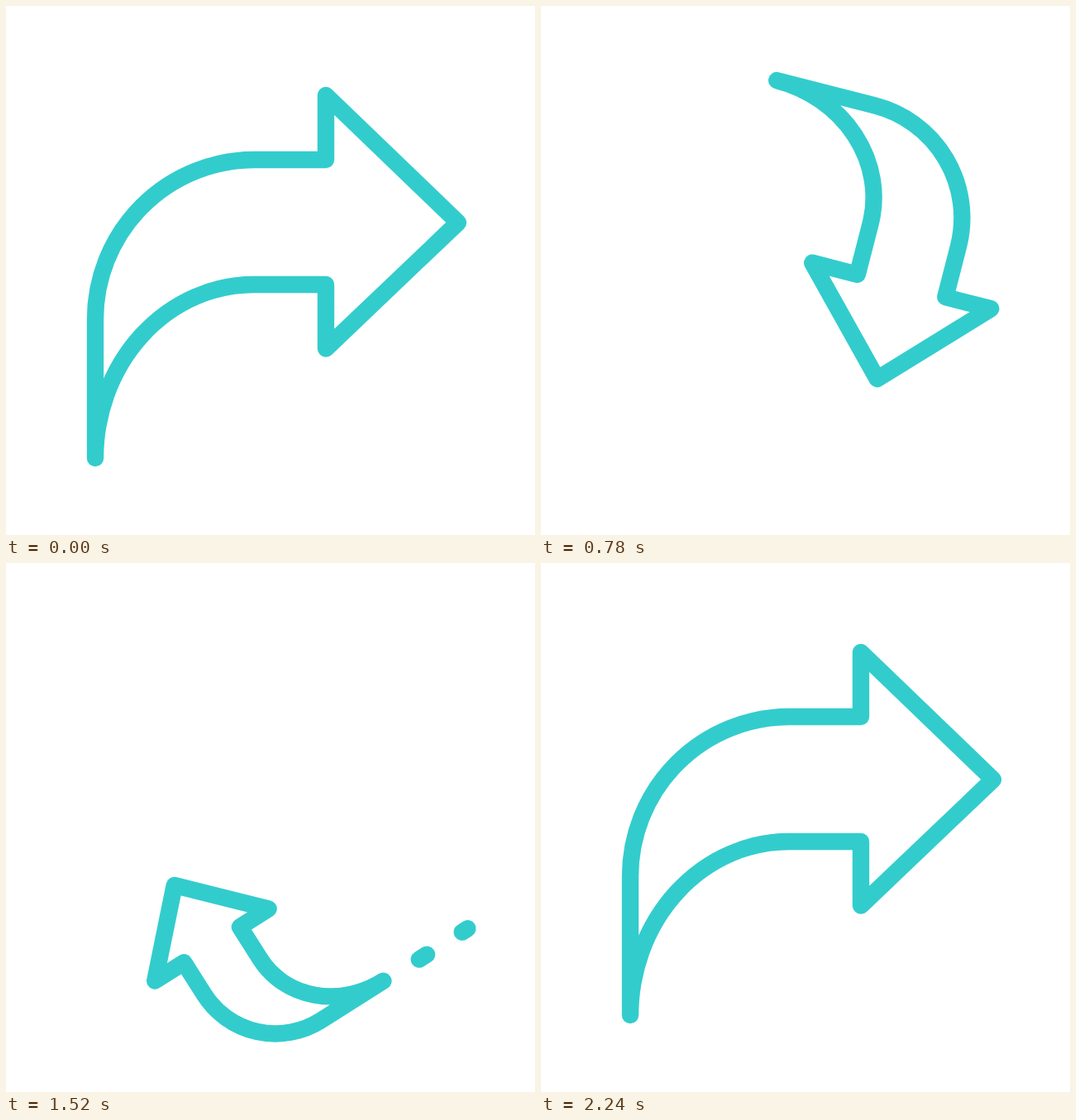
Write an HTML page that moves like this. It is 640 px wide and 640 px high and loops after 2400 ms.

```html
<!DOCTYPE html>
<html lang="en">
<head>
<meta charset="utf-8">
<title>Turning arrow</title>
<style>
  html, body { margin: 0; width: 100%; height: 100%; overflow: hidden; background: #fff; }
  svg { display: block; width: 100%; height: 100%; }
  path { fill: none; stroke: #33cccd; stroke-width: 20.4; stroke-linecap: round; stroke-linejoin: round; }
</style>
</head>
<body>
<svg viewBox="0 0 640 640">
  <g id="spin">
    <path id="dashA"/>
    <path id="dashB"/>
    <path id="arrow" d="M108 547V379A192.5 193 0 0 1 300 186H387V108L547 262L387 414.5V337H300A192 210 0 0 0 108 547Z"/>
  </g>
</svg>
<script>
const LOOP = 2400, STEP = 20, STROKE = 20.4;
const CENTER = 327.5;              // pivot of the turn
const ANCHOR = { x: 108, y: 107.5 }; // fixed corner while shrinking
const TAIL_Y = 547, DASH_X = 106.8;

// [time, value] tables, linear between entries
const angle = [[200, 0], [2200, 360]];
const size = [[200, 1], [1200, 0.531], [1700, 0.531], [2200, 1]];
const dashes = [
  { id: 'dashA', on: 1100, off: 1840,
    from: [[1220, 399.5], [1520, 391.5], [1840, 388]],
    to: [[1100, 399.5], [1220, 410], [1280, 412], [1520, 402.5], [1840, 397]] },
  { id: 'dashB', on: 1420, off: 2040,
    from: [[1520, 453], [1820, 461], [1880, 464]],
    to: [[1420, 453], [1520, 461], [1820, 471], [1880, 474]] }
];

const el = id => document.getElementById(id);

function at(table, t) {
  if (t <= table[0][0]) return table[0][1];
  for (let i = 1; i < table.length; i++) {
    const [t0, v0] = table[i - 1], [t1, v1] = table[i];
    if (t <= t1) return v0 + (v1 - v0) * (t - t0) / (t1 - t0);
  }
  return table[table.length - 1][1];
}

function draw(t) {
  const s = at(size, t);
  const tail = ANCHOR.y + s * (TAIL_Y - ANCHOR.y);
  el('spin').setAttribute('transform', `rotate(${at(angle, t)} ${CENTER} ${CENTER})`);

  const arrow = el('arrow');
  arrow.setAttribute('transform',
    `translate(${ANCHOR.x} ${ANCHOR.y}) scale(${s}) translate(${-ANCHOR.x} ${-ANCHOR.y})`);
  arrow.style.strokeWidth = STROKE / s; // line weight stays constant

  for (const d of dashes) {
    const y0 = at(d.from, t), y1 = at(d.to, t);
    const shown = t >= d.on && t < d.off && tail < y1;
    el(d.id).setAttribute('d', shown ? `M${DASH_X} ${y0}V${y1}` : '');
  }
}

const start = performance.now();
function tick() {
  const t = (performance.now() - start) % LOOP;
  draw(Math.floor(t / STEP) * STEP);
  requestAnimationFrame(tick);
}
draw(0);
requestAnimationFrame(tick);
</script>
</body>
</html>
```
